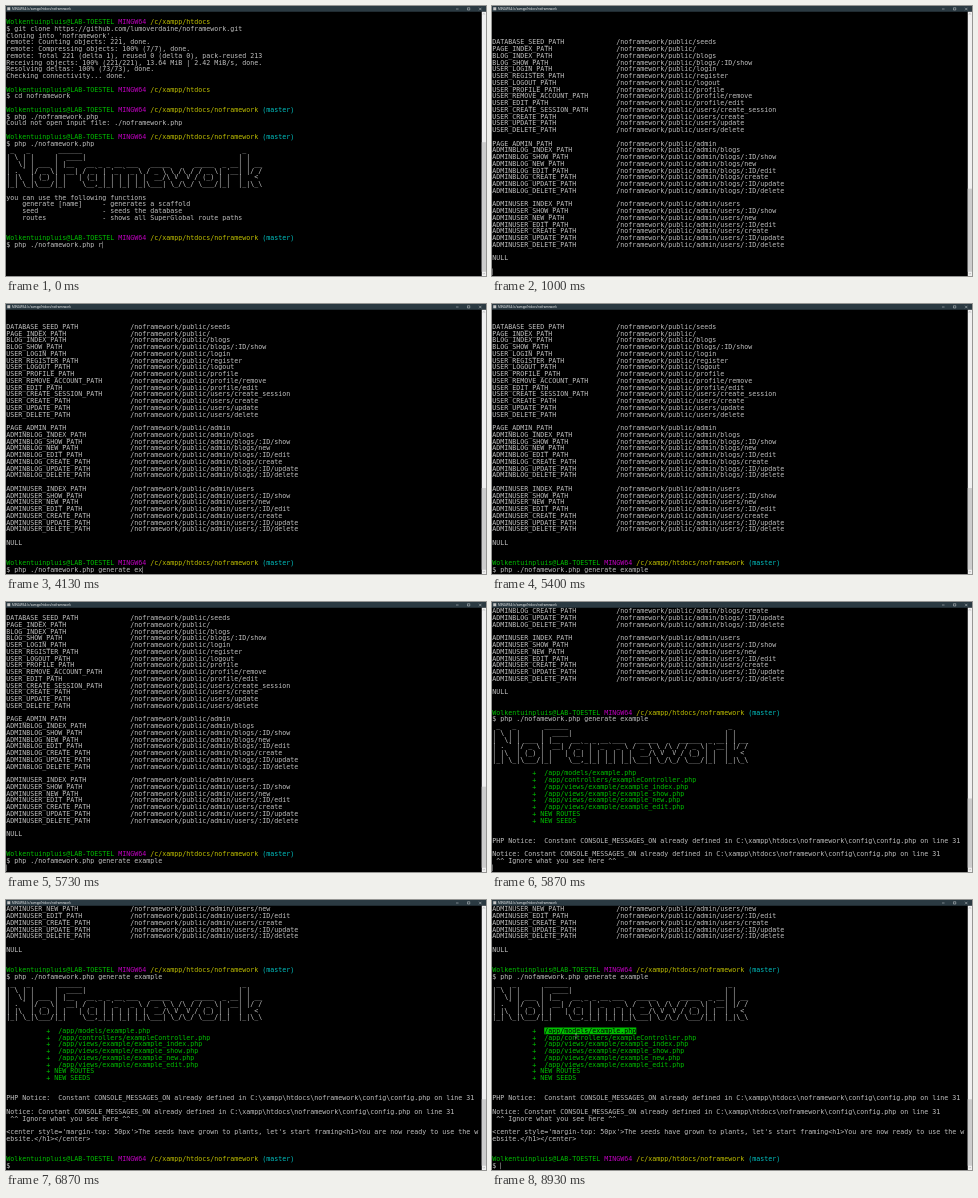
Animation of 480x270 px, one loop 9.07 s. Source, as an HTML page with a canvas:

```html
<!DOCTYPE html>
<html>
<head>
<meta charset="utf-8">
<title>Terminal session</title>
<style>
  html, body { margin: 0; width: 100%; height: 100%; overflow: hidden; background: #000; }
  canvas { display: block; }
</style>
</head>
<body>
<canvas id="stage" width="480" height="270"></canvas>
<script>
const LOOP = 9070, BLINK = 525;
const COL = 16, ROW = 27, TOP = 24, ROWS = 39, HISTORY = 38;   // layout on a 1920 x 1080 desktop
const GREY = '#bfbfbf', GREEN = '#00bf00', MAGENTA = '#bf00bf', YELLOW = '#bfbf00', CYAN = '#00bfbf';
const ctx = document.getElementById('stage').getContext('2d');
ctx.scale(0.25, 0.25);

// A row is a plain string or a list of [text, colour] pairs.
const prompt = (dir, branch = '') => [
  ['Wolkentuinpluis@LAB-TOESTEL ', GREEN], ['MINGW64 ', MAGENTA], [dir + ' ', YELLOW], [branch, CYAN]];
const home = prompt('/c/xampp/htdocs');
const project = prompt('/c/xampp/htdocs/noframework', '(master)');

const banner = [
  ' _   _       ______'.padEnd(59) + '_',
  String.raw`| \ | |     |  ____|`.padEnd(58) + '| |',
  String.raw`|  \| | ___ | |__   __ _ _ __ ___   _____      _____  _ __| | __`,
  "| . ` |/ _ \\|  __| / _` | '_ ` _ \\ / _ \\ \\ /\\ / / _ \\| '__| |/ /",
  String.raw`| |\  | (_) | |   | (_| | | | | | |  __/\ V  V / (_) | |  |   <`,
  String.raw`|_| \_|\___/|_|    \__,_|_| |_| |_|\___| \_/\_/ \___/|_|  |_|\_\ `
];

const route = (name, path) => (name + '_PATH').padEnd(31) + '/noframework/public/' + path;
const adminRoutes = (name, path) => [
  ['INDEX', ''], ['SHOW', '/:ID/show'], ['NEW', '/new'], ['EDIT', '/:ID/edit'],
  ['CREATE', '/create'], ['UPDATE', '/:ID/update'], ['DELETE', '/:ID/delete']
].map(([action, tail]) => route(`${name}_${action}`, path + tail));
const routes = [
  route('DATABASE_SEED', 'seeds'),
  route('PAGE_INDEX', ''),
  route('BLOG_INDEX', 'blogs'),
  route('BLOG_SHOW', 'blogs/:ID/show'),
  route('USER_LOGIN', 'login'),
  route('USER_REGISTER', 'register'),
  route('USER_LOGOUT', 'logout'),
  route('USER_PROFILE', 'profile'),
  route('USER_REMOVE_ACCOUNT', 'profile/remove'),
  route('USER_EDIT', 'profile/edit'),
  route('USER_CREATE_SESSION', 'users/create_session'),
  route('USER_CREATE', 'users/create'),
  route('USER_UPDATE', 'users/update'),
  route('USER_DELETE', 'users/delete'),
  '', route('PAGE_ADMIN', 'admin'), ...adminRoutes('ADMINBLOG', 'admin/blogs'),
  '', ...adminRoutes('ADMINUSER', 'admin/users')
];

const created = [
  ' /app/models/example.php', ' /app/controllers/exampleController.php',
  ...['index', 'show', 'new', 'edit'].map(view => ` /app/views/example/example_${view}.php`),
  'NEW ROUTES', 'NEW SEEDS'
].map(item => [[' '.repeat(10) + '+ ' + item, GREEN]]);
const notice = String.raw`Constant CONSOLE_MESSAGES_ON already defined in C:\xampp\htdocs\noframework\config\config.php on line 31`;

// Output events: the first row continues the cursor line, the others follow below it.
const events = [];
const emit = (at, ...rows) => events.push({ at, rows });
const type = (text, ...times) => times.forEach((at, i) => emit(at, text[i]));
const enter = at => emit(at, '', '');

emit(0, '',
  home,
  '$ git clone https://github.com/lumoverdaine/noframework.git',
  "Cloning into 'noframework'...",
  'remote: Counting objects: 221, done.',
  'remote: Compressing objects: 100% (7/7), done.',
  'remote: Total 221 (delta 1), reused 0 (delta 0), pack-reused 213',
  'Receiving objects: 100% (221/221), 13.64 MiB | 2.42 MiB/s, done.',
  'Resolving deltas: 100% (73/73), done.',
  'Checking connectivity... done.',
  '', home, '$ cd noframework',
  '', project, '$ php ./noframework.php',
  'Could not open input file: ./noframework.php',
  '', project, '$ php ./nofamework.php',
  ...banner, '',
  'you can use the following functions',
  '    generate [name]     - generates a scaffold',
  '    seed                - seeds the database',
  '    routes              - shows all SuperGlobal route paths',
  '', '', project, '$ php ./nofamework.php r');
type('outes', 130, 270, 400, 530, 670);
enter(930);
emit(995, ...banner, '', '', '', '', '', '', ...routes, '', 'NULL', '', '');
emit(1195, '', project, '$ ');
emit(1925, 'php ./nofamework.php');
type(' generate ', 1990, 2270, 2400, 2530, 2730, 2925, 3065, 3125, 3270, 3400);
type('example', 3595, 4120, 4325, 4395, 4595, 4730, 4870);
enter(5665);
emit(5865, ...banner, '', ...created, '', '',
  'PHP Notice:  ' + notice, '', 'Notice: ' + notice, ' ^^ Ignore what you see here ^^', '');
emit(6190, '',
  "<center style='margin-top: 50px'>The seeds have grown to plants, let's start framing<h1>You are now ready to use the w",
  'ebsite.</h1></center>', '', '');
emit(6330, '', project, '$ ');

const pointerPath = [[7070, 270, 256], [7200, 170, 148], [7870, 184, 134], [8400, 150, 136], [8590, 100, 136], [8920, 84, 136]];

function rect(color, x, y, w, h) {
  ctx.fillStyle = color;
  ctx.fillRect(x, y, w, h);
}

function drawRow(row, y) {
  let x = 1;
  for (const [text, color] of typeof row === 'string' ? [[row, GREY]] : row) {
    ctx.fillStyle = color;
    ctx.fillText(text, x, y + 21);
    x += text.length * COL;
  }
}

function drawSelection(y) {
  rect(GREEN, 1 + 13 * COL, y, 23 * COL, ROW);
  ctx.fillStyle = '#000';
  ctx.fillText('/app/models/example.php', 1 + 13 * COL, y + 21);
}

function drawPointer(t) {
  const next = pointerPath.findIndex(p => p[0] > t);
  if (next === 0) return;
  const b = pointerPath.at(next), a = next < 0 ? b : pointerPath[next - 1];
  const k = a === b ? 0 : (t - a[0]) / (b[0] - a[0]);
  const x = 4 * (a[1] + (b[1] - a[1]) * k), y = 4 * (a[2] + (b[2] - a[2]) * k);
  const color = 'rgba(255,255,255,.6)';
  rect(color, x - 1, y - 8, 2, 16);
  rect(color, x - 4, y - 9, 8, 2);
  rect(color, x - 4, y + 7, 8, 2);
}

function drawWindow(scroll) {
  rect('#2b3a42', 0, 0, 1920, 23);
  rect('#c8c8c8', 5, 5, 12, 12);
  ctx.font = "12px 'Open Sans', sans-serif";
  ctx.fillStyle = '#fff';
  ctx.fillText('MINGW64:/c/xampp/htdocs/noframework', 24, 16);
  ctx.strokeStyle = '#fff';
  ctx.lineWidth = 1.5;
  ctx.beginPath();
  ctx.moveTo(1800, 12); ctx.lineTo(1810, 12);
  ctx.rect(1846, 7, 9, 9);
  ctx.moveTo(1892, 7); ctx.lineTo(1902, 17);
  ctx.moveTo(1902, 7); ctx.lineTo(1892, 17);
  ctx.stroke();

  const track = 1023, total = scroll + ROWS;
  rect('#f0f0f0', 1903, 23, 17, 1057);
  rect('#cdcdcd', 1903, 40 + track * scroll / total, 17, track * ROWS / total);
  ctx.strokeStyle = '#606060';
  ctx.beginPath();
  ctx.moveTo(1908, 34); ctx.lineTo(1911.5, 30); ctx.lineTo(1915, 34);
  ctx.moveTo(1908, 1069); ctx.lineTo(1911.5, 1073); ctx.lineTo(1915, 1069);
  ctx.stroke();
}

function draw(now) {
  const t = now % LOOP;
  const lines = [''];
  let lastOutput = 0;
  for (const { at, rows } of events) {
    if (at > t) break;
    lines[lines.length - 1] += rows[0];
    lines.push(...rows.slice(1));
    lastOutput = at;
  }
  const cursorLine = lines.length - 1;
  const top = Math.max(0, cursorLine - ROWS + 1);
  const rowY = line => TOP + (line - top) * ROW;

  rect('#000', 0, 0, 1920, 1080);
  ctx.font = "26.58px 'DejaVu Sans Mono', monospace";
  lines.slice(top).forEach((row, i) => drawRow(row, TOP + i * ROW));
  if (t >= 8590) drawSelection(rowY(lines.indexOf(created[0])));
  if ((t - lastOutput) % (2 * BLINK) < BLINK)
    rect(GREY, 1 + lines[cursorLine].length * COL, rowY(cursorLine), 2, ROW);
  drawPointer(t);
  drawWindow(HISTORY + top);
  requestAnimationFrame(draw);
}
requestAnimationFrame(draw);
</script>
</body>
</html>
```
